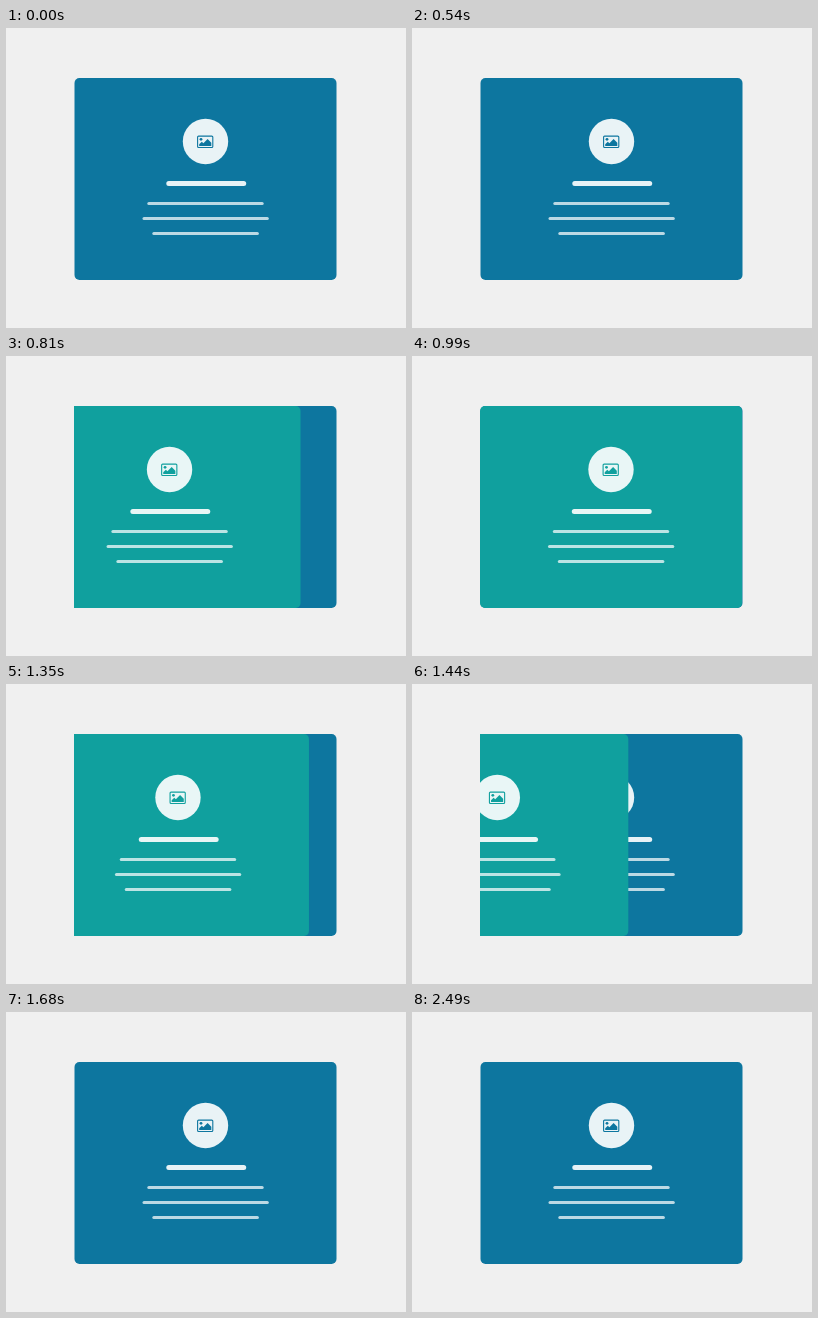
These frames come from a looping animation (400 by 300 pixels, 2520 ms). An HTML page:

```html
<!DOCTYPE html>
<html lang="en">
<head>
<meta charset="utf-8">
<title>Sliding card</title>
<style>
  html, body { margin: 0; height: 100%; overflow: hidden; background: #f0f0f0; }
  svg { display: block; width: 100vw; height: 100vh; }
  .blue { color: #0d769f; }
  .teal { color: #10a09e; }
</style>
</head>
<body>
<svg viewBox="0 0 400 300">
  <defs>
    <clipPath id="stage"><rect x="68" y="49" width="264" height="204"/></clipPath>
    <g id="card">
      <rect x="68.5" y="50" width="262" height="202" rx="5" fill="currentColor"/>
      <circle cx="199.5" cy="113.5" r="22.7" fill="#fff" fill-opacity=".91"/>
      <g fill="currentColor">
        <rect x="191.6" y="108.1" width="15.2" height="11.4" rx="1" fill="none" stroke="currentColor" stroke-width="1.1"/>
        <circle cx="195" cy="111.3" r="1.4"/>
        <path d="M193.2 118v-1.8l2.6-2.5 1.6 1.5 4.2-4.2 3.7 3.7v3.3z"/>
      </g>
      <g fill="#fff">
        <rect x="160.3" y="153" width="79.9" height="5" rx="2.5" fill-opacity=".9"/>
        <g fill-opacity=".72">
          <rect x="141.3" y="174" width="116.4" height="3" rx="1.5"/>
          <rect x="136.5" y="189" width="126.3" height="3" rx="1.5"/>
          <rect x="146.3" y="204" width="106.6" height="3" rx="1.5"/>
        </g>
      </g>
    </g>
  </defs>
  <use href="#card" class="blue"/>
  <g clip-path="url(#stage)"><use id="cover" href="#card" class="teal"/></g>
</svg>
<script>
const LOOP = 2520, TICK = 30, SLIDE = 380, TRAVEL = 263;
const ENTER = 527, LEAVE = 1265;
const cover = document.getElementById('cover');

// cubic-bezier(.42, 0, .58, 1), solved by bisection
function easeInOut(x) {
  if (x <= 0) return 0;
  if (x >= 1) return 1;
  let lo = 0, hi = 1, s;
  for (let i = 0; i < 20; i++) {
    s = (lo + hi) / 2;
    const bx = 3 * (1 - s) * s * (.42 * (1 - s) + .58 * s) + s ** 3;
    if (bx < x) lo = s; else hi = s;
  }
  return s * s * (3 - 2 * s);
}

function draw(now) {
  const t = Math.floor(now % LOOP / TICK) * TICK;
  const shown = easeInOut((t - ENTER) / SLIDE) - easeInOut((t - LEAVE) / SLIDE);
  cover.setAttribute('transform', `translate(${-TRAVEL * (1 - shown) - .5} 0)`);
}

const start = performance.now();
function loop() {
  draw(performance.now() - start);
  requestAnimationFrame(loop);
}
loop();
</script>
</body>
</html>
```
